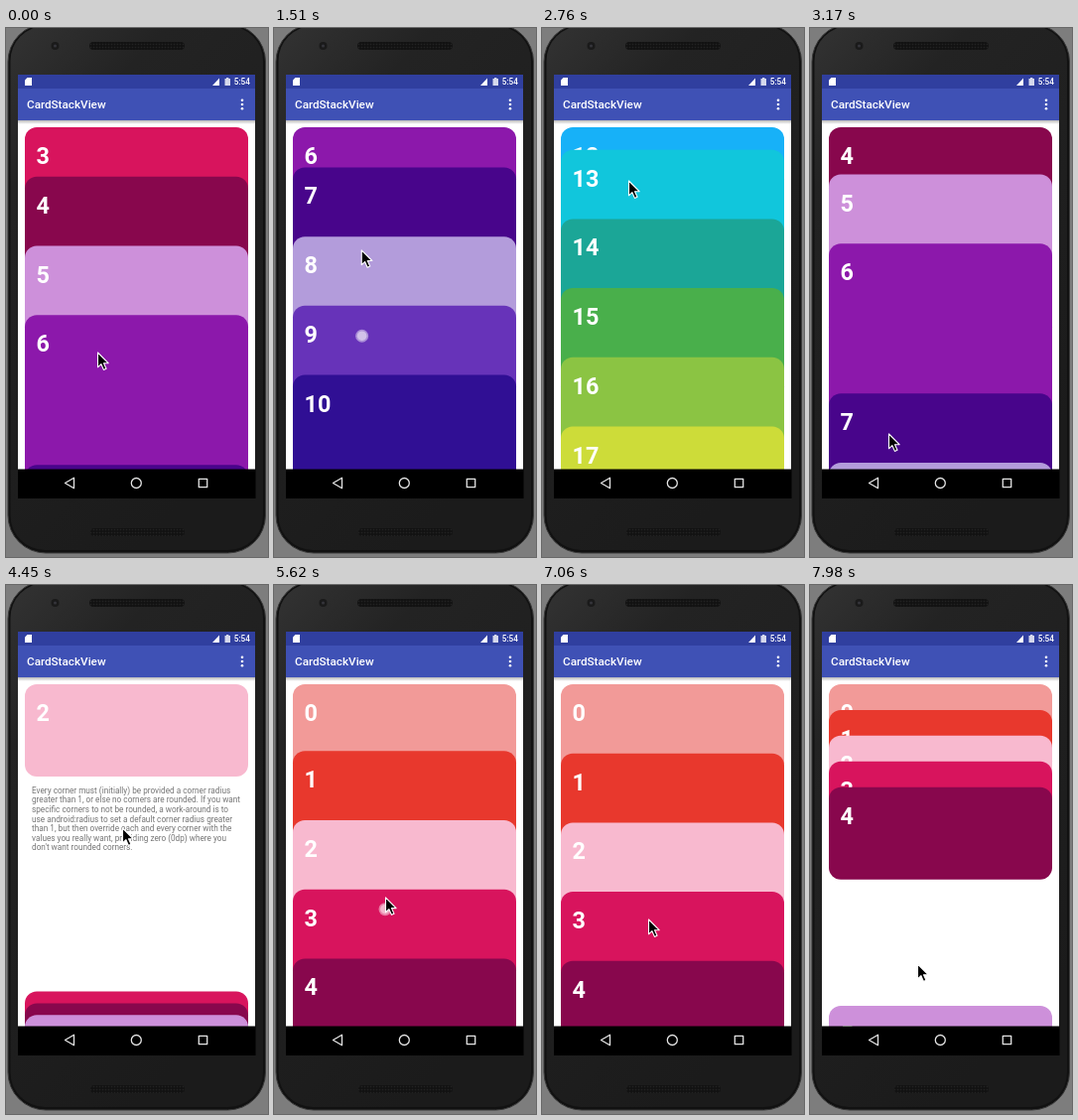
Write an HTML page that moves like this. It is 264 by 533 pixels and loops after 8 s.

```html
<!DOCTYPE html>
<html lang="en">
<head>
<meta charset="utf-8">
<title>Card stack</title>
<style>
html, body { margin: 0; width: 100%; height: 100%; overflow: hidden; background: #7d7d7d; }
svg { display: block; width: 100vw; height: 100vh; font-family: Roboto, sans-serif; }
.num { font-size: 23.4px; font-weight: 700; fill: #fff; }
.note { font-size: 8.22px; fill: #757575; }
</style>
</head>
<body>
<svg viewBox="0 0 264 533">
  <defs>
    <linearGradient id="body" x2=".5" y2="1">
      <stop offset="0" stop-color="#333"/>
      <stop offset=".25" stop-color="#232323"/>
      <stop offset="1" stop-color="#1b1b1b"/>
    </linearGradient>
    <linearGradient id="shade" x2="0" y2="1">
      <stop offset="0" stop-color="#000" stop-opacity=".28"/>
      <stop offset="1" stop-color="#000" stop-opacity="0"/>
    </linearGradient>
    <pattern id="mesh" width="3" height="3" patternUnits="userSpaceOnUse">
      <rect width="3" height="3" fill="#121212"/>
      <circle cx="1.5" cy="1.5" r=".8" fill="#222"/>
    </pattern>
    <clipPath id="view"><rect x="12" y="93" width="239" height="352"/></clipPath>
  </defs>

  <rect width="264" height="533" fill="#7d7d7d"/>
  <rect x="2" y="-4" width="259.5" height="533" rx="38" fill="#111" stroke="#3a3a3a"/>
  <rect x="4.5" y="-2" width="254.5" height="528" rx="35" fill="url(#body)"/>
  <circle cx="49.5" cy="18" r="4" fill="#1a1a1a"/>
  <circle cx="49.5" cy="18" r="1.6" fill="#34343a"/>
  <rect x="84" y="14" width="96" height="8" rx="4" fill="url(#mesh)"/>
  <rect x="85" y="504" width="95" height="8" rx="4" fill="url(#mesh)"/>

  <rect x="12" y="93" width="239" height="352" fill="#fff"/>
  <g clip-path="url(#view)">
    <g id="cards"></g>
    <rect x="12" y="93" width="239" height="4" fill="url(#shade)"/>
  </g>

  <rect x="12" y="47" width="239" height="14" fill="#303f9f"/>
  <rect x="12" y="61" width="239" height="32" fill="#3f51b5"/>
  <g fill="#fff">
    <path d="M21.5 50H26v8h-7v-5.5z"/>
    <path d="M208 58h7v-7.5z"/>
    <path d="M222 50h2.4v1h1.6v7h-5.5v-7H222z" opacity=".8"/>
    <text x="229.8" y="57.2" font-size="8.2" font-weight="500">5:54</text>
    <text x="21" y="81" font-size="11.7" font-weight="500">CardStackView</text>
    <circle cx="238" cy="72.7" r="1.3"/>
    <circle cx="238" cy="77" r="1.3"/>
    <circle cx="238" cy="81.3" r="1.3"/>
  </g>

  <rect x="12" y="444.5" width="239.5" height="29.5" fill="#000"/>
  <g fill="none" stroke="#e4e4e4" stroke-width="1.3" stroke-linejoin="round">
    <path d="M59.5 458.5l9-5.2v10.400z"/>
    <circle cx="131.3" cy="458.5" r="5"/>
    <rect x="194.3" y="454.3" width="8.4" height="8.4"/>
  </g>

  <g id="dot" fill="#fff" fill-opacity=".45">
    <circle r="6.5"/>
    <circle r="4.8"/>
  </g>
  <path id="cursor" d="M.5 0V14.8L3.900 11.7 6.4 17.4 9 16.3 6.5 10.7H11.1Z"
    fill="#000" stroke="#fff" stroke-width="1.1" stroke-linejoin="round"/>
</svg>

<script>
const LOOP = 8000, TOP = 100, BOTTOM = 445, STEP = 69.7, TALL_STEP = 151, OVERLAP = 23.4, PEEK = 11.8;
const TOUCH_LAG = 60, TAP = 90, TOGGLE = 400;
const COLORS = ['#f29a98', '#e8382d', '#f8b9cf', '#d8145d', '#88074d', '#cd90da',
  '#8c18ab', '#48058b', '#b39cdb', '#6733b9', '#300f94', '#3a53ff',
  '#17b1f8', '#11c6dc', '#1ba697', '#49af4b', '#8bc443', '#cddc39'];
const NOTE = ['Every corner must (initially) be provided a corner radius',
  'greater than 1, or else no corners are rounded. If you want',
  'specific corners to not be rounded, a work-around is to',
  'use android:radius to set a default corner radius greater',
  'than 1, but then override each and every corner with the',
  'values you really want, providing zero (0dp) where you',
  "don't want rounded corners."];

// Pointer moves; a drag scrolls the stack and may end in a fling that glides on
const START = { x: 92, y: 327, scroll: 229 };
const MOVES = [
  { at: 50, time: 730, x: 90, y: 62, drag: true },
  { at: 860, time: 500, x: 89, y: 345 },
  { at: 1396, time: 196, x: 87, y: 154, drag: true, fling: 361, glide: 748 },
  { at: 2770, time: 200, x: 79, y: 409, drag: true, fling: -791, glide: 512 },
  { at: 3180, time: 450, x: 117, y: 245 },
  { at: 5200, time: 280, x: 112, y: 329 },
  { at: 5520, time: 640, x: 112, y: 95, drag: true },
  { at: 6274, time: 460, x: 107, y: 337, drag: true },
  { at: 7290, time: 170, x: 108, y: 382 }
];
const PICKS = [{ card: 2, open: 3925, close: 4785 }, { card: 4, open: 7748, close: Infinity }];

const $ = id => document.getElementById(id);
function add(parent, tag, attrs, text) {
  const el = document.createElementNS('http://www.w3.org/2000/svg', tag);
  for (const k in attrs) el.setAttribute(k, attrs[k]);
  if (text !== undefined) el.textContent = text;
  return parent.appendChild(el);
}
const place = (el, x, y) => el.setAttribute('transform', `translate(${x.toFixed(2)} ${y.toFixed(2)})`);
const show = (el, on) => el.setAttribute('visibility', on ? 'visible' : 'hidden');

const clamp = u => Math.min(1, Math.max(0, u));
const ease = u => .5 - Math.cos(Math.PI * clamp(u)) / 2;
const easeOut = u => 1 - (1 - clamp(u)) ** 3;
const within = (t, start, length) => t >= start && t < start + length;

function pointer(t) {
  let { x, y } = START;
  for (const m of MOVES) {
    const k = ease((t - m.at) / m.time);
    x += (m.x - x) * k;
    y += (m.y - y) * k;
  }
  return { x, y };
}

function scrollAt(t) {
  let { y, scroll } = START;
  for (const m of MOVES) {
    const lifted = m.at + m.time + TOUCH_LAG;
    if (m.drag) scroll += (y - m.y) * ease((t - TOUCH_LAG - m.at) / m.time);
    if (m.fling) scroll += m.fling * easeOut((t - lifted) / m.glide);
    y = m.y;
  }
  return Math.max(0, scroll);
}

const touching = t =>
  MOVES.some(m => m.drag && within(t, m.at, m.time + TOUCH_LAG)) ||
  PICKS.some(p => within(t, p.open, TAP) || within(t, p.close, TAP));

let home = TOP;
const cards = COLORS.map((fill, i) => {
  const gap = i === 6 || i === 10 ? TALL_STEP : STEP;
  const el = add($('cards'), 'g', {});
  add(el, 'rect', { x: 19, width: 225, height: gap + OVERLAP, rx: 12, fill });
  add(el, 'text', { x: 30.5, y: 37, class: 'num' }, i);
  const card = { el, home };
  home += gap;
  return card;
});
const note = add($('cards'), 'g', { class: 'note' });
NOTE.forEach((line, i) => add(note, 'text', { x: 26, y: 209.8 + i * 9.57 }, line));

function draw(t) {
  const scroll = scrollAt(t);
  const pick = PICKS.find(p => t < p.close + TOGGLE);
  const k = ease((t - pick.open) / TOGGLE) - ease((t - pick.close) / TOGGLE);
  const ys = cards.map(({ home }, i) => {
    const rest = Math.max(TOP, home - scroll);
    const below = i - pick.card - 1;
    const goal = below < 0 ? TOP : BOTTOM - PEEK * Math.max(0, 3 - below);
    return rest + (goal - rest) * k;
  });
  cards.forEach(({ el }, i) => {
    place(el, 0, ys[i]);
    show(el, !(ys[i + 1] <= TOP));
  });
  show(note, k > .999);

  const now = pointer(t), finger = pointer(t - TOUCH_LAG);
  place($('cursor'), now.x, now.y);
  place($('dot'), finger.x, finger.y);
  show($('dot'), touching(t));
}

function tick(now) {
  draw(now % LOOP);
  requestAnimationFrame(tick);
}
draw(0);
requestAnimationFrame(tick);
</script>
</body>
</html>
```
